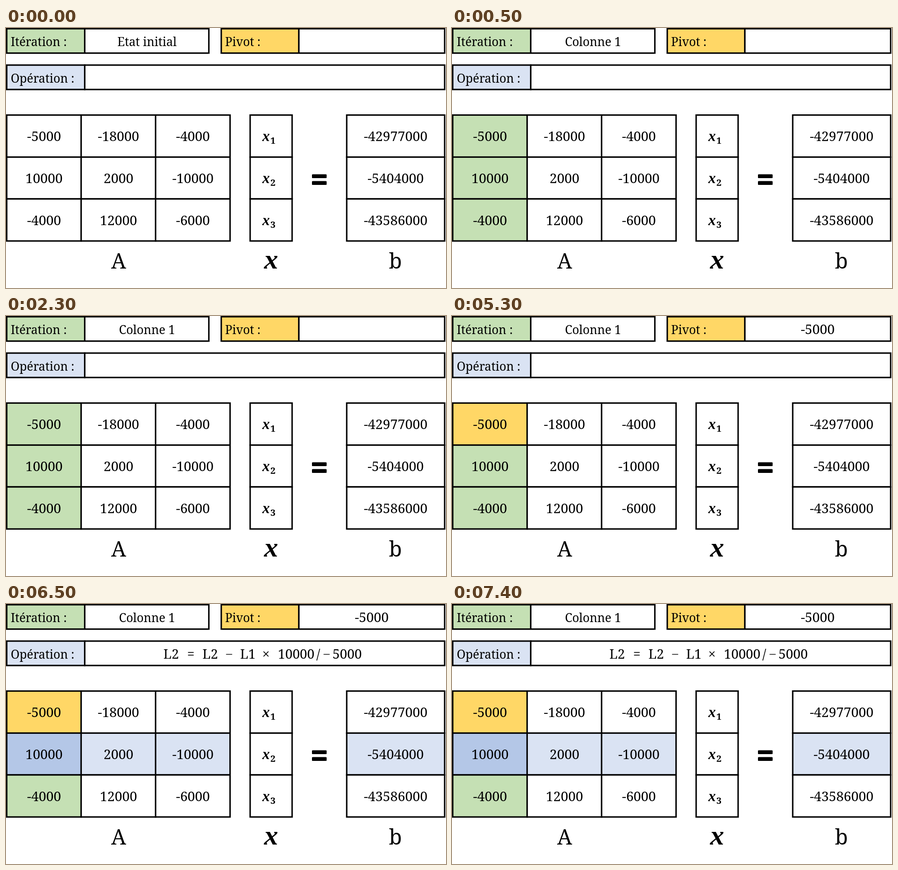
Write an HTML page that moves like this. It is 975 px wide and 575 px high and loops after 8 s.

```html
<!DOCTYPE html>
<html lang="fr">
<head>
<meta charset="utf-8">
<title>Pivot de Gauss</title>
<style>
html, body { margin: 0; width: 100%; height: 100%; overflow: hidden; background: #fff; }
svg { display: block; width: 975px; height: 575px; }
text { font: 500 26.4px "Noto Serif", serif; fill: #000; }
.mid { text-anchor: middle; }
.num { font-size: 29.5px; }
.math { font-size: 29px; font-weight: 400; }
.var { font: italic bold 33px "Liberation Serif", serif; }
.sub { font-size: 20px; font-weight: 600; }
.big { font-size: 47px; font-weight: 400; }
.bigvar { font-size: 62px; }
.cell { stroke: #000; stroke-width: 3.2; }
</style>
</head>
<body>
<svg id="stage" viewBox="0 0 975 575"></svg>
<script>
const GREEN = '#c5e0b4', YELLOW = '#ffd766', BLUE = '#dae3f3', DARK = '#b4c7e7', WHITE = '#fff';
const stage = document.getElementById('stage');

function add(tag, attrs, parent = stage) {
  const el = document.createElementNS('http://www.w3.org/2000/svg', tag);
  for (const key in attrs) el.setAttribute(key, attrs[key]);
  return parent.appendChild(el);
}
function box(x1, y1, x2, y2, fill = WHITE) {
  return add('rect', { class: 'cell', x: x1, y: y1, width: x2 - x1, height: y2 - y1, fill });
}
function label(str, x, y, cls = '', parent = stage) {
  const el = add('text', { class: cls, x, y }, parent);
  el.textContent = str;
  return el;
}

// Header boxes
box(1.6, 1.6, 174.5, 55.5, GREEN);
box(174.5, 1.6, 449.5, 55.5);
box(477, 1.6, 649, 55.5, YELLOW);
box(649, 1.6, 972, 55.5);
box(1.6, 82, 174.5, 136, BLUE);
box(174.5, 82, 972, 136);
label('Itération :', 10.5, 40);
label('Pivot :', 485.5, 40);
label('Opération :', 10.5, 121);
const iteration = label('', 312.5, 40, 'mid');
const pivot = label('', 810.5, 40, 'mid num');

const operation = add('g', {});
[['L2', 366], ['=', 409.5], ['L2', 452.5], ['−', 494.5], ['L1', 536], ['×', 576],
 ['10000', 643], ['/', 692], ['−', 710.5], ['5000', 756]]
  .forEach(([str, x]) => label(str, x, 121, 'mid math', operation));

// Linear system
const rows = [192.5, 285.5, 378, 471], cols = [1.6, 166.5, 331.5, 496.5];
const A = [[-5000, -18000, -4000], [10000, 2000, -10000], [-4000, 12000, -6000]];
const b = [-42977000, -5404000, -43586000];
const cells = {};
A.forEach((line, r) => {
  const top = rows[r], bottom = rows[r + 1], base = (top + bottom) / 2 + 11;
  line.forEach((value, c) => {
    cells['a' + r + c] = box(cols[c], top, cols[c + 1], bottom);
    label(value, (cols[c] + cols[c + 1]) / 2 + 0.3, base, 'mid num');
  });
  box(541, top, 634, bottom);
  label('x', 568, base, 'var');
  label(r + 1, 591.5, base + 6, 'mid sub');
  cells['b' + r] = box(755, top, 972, bottom);
  label(b[r], 863.5, base, 'mid num');
});
for (const y of [323.5, 338.5]) add('rect', { x: 678, y, width: 32.5, height: 8.5, rx: 1.5 });
label('A', 249.5, 532, 'mid big');
label('x', 587.5, 532, 'mid var bigvar');
label('b', 863, 532, 'mid big');

const col1 = { a00: GREEN, a10: GREEN, a20: GREEN };
const withPivot = { ...col1, a00: YELLOW };
const withRow = { ...withPivot, a10: DARK, a11: BLUE, a12: BLUE, b1: BLUE };
const STEPS = [
  { at: 0, iter: 'Etat initial', pivot: '', op: false, fills: {} },
  { at: 500, iter: 'Colonne 1', pivot: '', op: false, fills: col1 },
  { at: 3500, iter: 'Colonne 1', pivot: '-5000', op: false, fills: withPivot },
  { at: 6500, iter: 'Colonne 1', pivot: '-5000', op: true, fills: withRow }
];
const LOOP = 8000;
let shown = null;

function show(step) {
  if (step === shown) return;
  shown = step;
  iteration.textContent = step.iter;
  pivot.textContent = step.pivot;
  operation.setAttribute('visibility', step.op ? 'visible' : 'hidden');
  for (const id in cells) cells[id].setAttribute('fill', step.fills[id] || WHITE);
}

const start = performance.now();
function tick() {
  const t = (performance.now() - start) % LOOP;
  show(STEPS.filter(s => s.at <= t).pop());
  requestAnimationFrame(tick);
}
tick();
</script>
</body>
</html>
```
